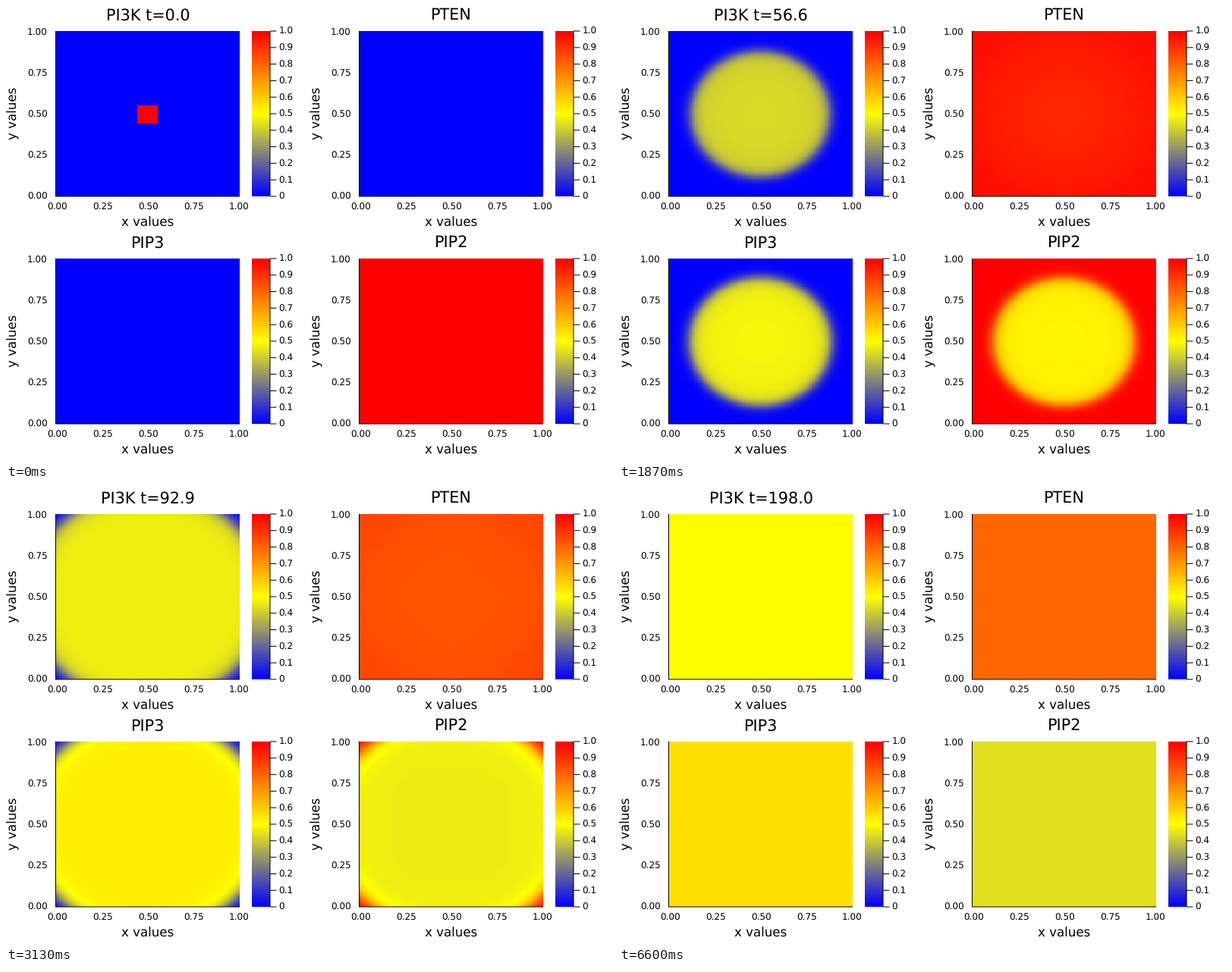
A matplotlib script for the animation above (6670 ms loop, 800x600 px).

```python
import numpy as np
import matplotlib.pyplot as plt
from matplotlib.animation import FuncAnimation
from matplotlib.colors import LinearSegmentedColormap

W, H, DPI = 800, 600, 100
FRAMES, LOOP_MS, T_END = 100, 6670, 200.0
N = 100
MAP_W, MAP_H = 242, 218

plt.rcParams["font.family"] = "DejaVu Sans"
plt.rcParams["text.hinting"] = "none"
fig = plt.figure(figsize=(W / DPI, H / DPI), dpi=DPI, facecolor="white")
ax = fig.add_axes([0, 0, 1, 1], zorder=1)
ax.axis("off")

cmap = LinearSegmentedColormap.from_list("byr", ["#0000ff", "#ffff00", "#ff0000"], N=256)

# Cell offsets from the seeded cell, and cell centres on the unit square
offset = np.abs(np.arange(N) - 49) / N
DX, DY = np.meshgrid(offset, offset)
unit = (np.arange(N) + 0.5) / N
RIPPLE = np.outer(np.cos(2 * np.pi * unit), np.cos(2 * np.pi * unit))

# Cell shown at each pixel of a heatmap
PIXELS = np.ix_(np.arange(MAP_H) * N // MAP_H, np.arange(MAP_W) * N // MAP_W)

# Levels at key times
KEY_T = [0, 24.2, 42.4, 68.7, 80.8, 119.2, 200]
PI3K_LEVEL = [0.38, 0.395, 0.41, 0.44, 0.46, 0.50, 0.50]
PIP3_LEVEL = [0.42, 0.445, 0.46, 0.50, 0.525, 0.56, 0.56]
PTEN_MID = [1.0, 0.983, 0.96, 0.89, 0.845, 0.80, 0.80]
PTEN_FAR = [1.0, 1.0, 0.997, 0.985, 0.94, 0.80, 0.80]


def at(t, values):
    return np.interp(t, KEY_T, values)


def disc(r, radius, width, rim):
    """Smooth-edged disc, weaker near its rim."""
    depth = radius - r
    body = 0.5 * (1 + np.tanh(depth / (2 * width)))
    return body * (1 - rim * np.exp(-np.clip(depth, 0, None) / 0.06))


def fields(t):
    """PI3K, PTEN, PIP3 and PIP2 concentrations at time t."""
    p = 2 + 40 * np.exp(-t / 5)  # square seed relaxing to a circle
    r = (DX ** p + DY ** p) ** (1 / p)
    radius = 0.055 + 0.0048 * t + 1.75e-5 * t * t
    width = 0.0005 + (0.0105 + 1.25e-4 * t) * min(1, t / 4)
    rim = 0.2 * (1 - np.exp(-t / 40))
    ripple = RIPPLE * np.clip((t - 80) / 30, 0, 1) * np.exp(-max(0, t - 119) / 28)

    level = at(t, PI3K_LEVEL)
    pi3k = (level + (1 - level) * np.exp(-t / 2.5)) * disc(r, radius, width, rim)

    rise = 1 - np.exp(-t / 3)
    pip3 = at(t, PIP3_LEVEL) * rise * disc(r, radius + 0.008, width, rim) + 0.003 * ripple

    mid, far = at(t, PTEN_MID), at(t, PTEN_FAR)
    spread = 0.05 + 1.3 * radius
    dist2 = DX ** 2 + DY ** 2
    pten = rise * (far - (far - mid) * np.exp(-dist2 / spread ** 2)) + 0.009 * ripple
    return pi3k, pten, pip3, 1 - pip3


def label(x, y, text, px, ha="center", **kw):
    return ax.text(x, y, text, fontsize=px * 72 / DPI, ha=ha, va="baseline",
                   color="black", **kw)


def line(xs, ys):
    ax.plot(xs, ys, color="black", lw=72 / DPI, solid_capstyle="butt", snap=False)


def bitmap(values, x, bottom):
    return fig.figimage(values, x, H - bottom, cmap=cmap, vmin=0, vmax=1, origin="lower")


def panel(ox, oy, name):
    left, right, top, bottom = ox + 66, ox + 308, oy + 33, oy + 251
    img = bitmap(np.zeros((MAP_H, MAP_W)), left, bottom)
    line([left - 1, right], [bottom, bottom])
    line([left - 0.5] * 2, [top, bottom])
    for k in range(5):
        tick = f"{k / 4:.2f}"
        label(ox + 67.2 + 60 * k, oy + 269.3, tick, 12)
        label(ox + 54.5, oy + 255 - 54.1 * k, tick, 12, ha="right")
    label(ox + 187, oy + 291, "x values", 16.6)
    label(ox + 14, oy + 141.7, "y values", 16.6, rotation=90, rotation_mode="anchor")

    ramp = np.linspace(0, 1, MAP_H)[:, None]
    bitmap(np.repeat(ramp, 24, axis=1), ox + 324, bottom)
    line([ox + 348] * 2, [top, bottom])
    for k in range(11):
        y = bottom - 21.8 * k
        line([ox + 348, ox + 356.5], [y, y])
        label(ox + 359.3, y + 4.3, "0" if k == 0 else f"{k / 10:.1f}", 12, ha="left")
    title = label(ox + 187, oy + 18.3, name, 20.8)
    return img, title


NAMES = ["PI3K", "PTEN", "PIP3", "PIP2"]
panels = [panel(400 * (i % 2), 300 * (i // 2), name) for i, name in enumerate(NAMES)]
images = [img for img, _ in panels]
clock = panels[0][1]
ax.set_xlim(0, W)
ax.set_ylim(H, 0)


def update(i):
    t = T_END * i / (FRAMES - 1)
    for img, values in zip(images, fields(t)):
        img.set_data(values[PIXELS])
    clock.set_text(f"PI3K t={t:.1f}")
    return images + [clock]


anim = FuncAnimation(fig, update, frames=FRAMES, interval=LOOP_MS / FRAMES,
                     init_func=lambda: update(0), repeat=True, repeat_delay=0, blit=False)
plt.show()
```
